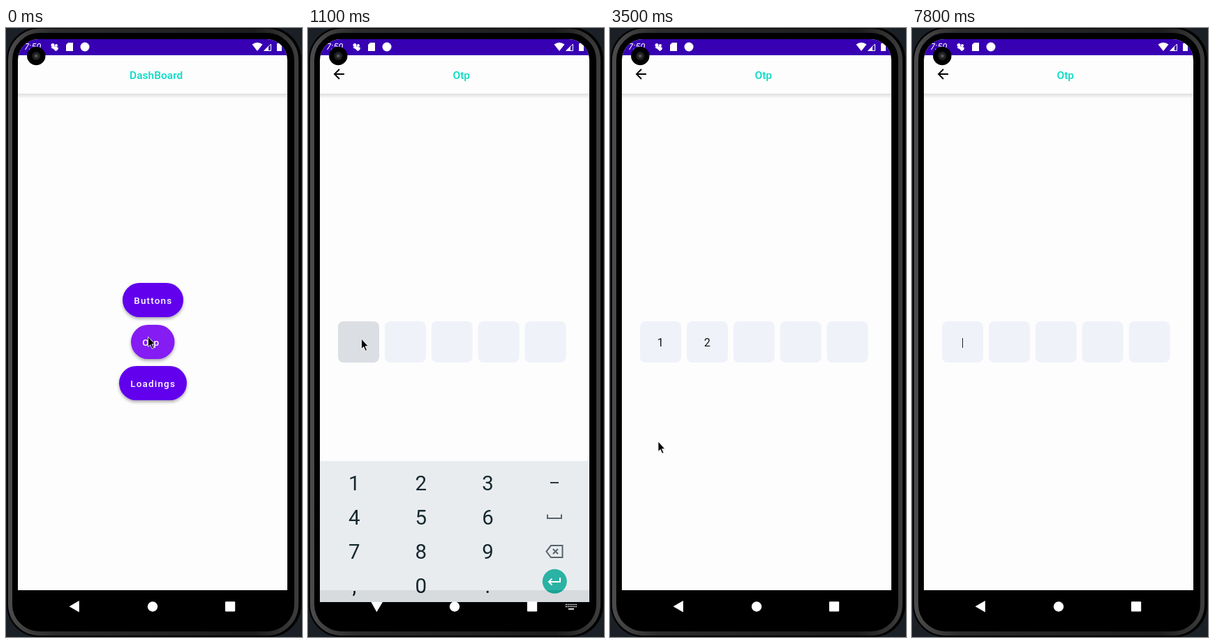
An HTML page for the animation above (7.9 s loop, 424 by 872 pixels).

```html
<!DOCTYPE html>
<html lang="en">
<head>
<meta charset="utf-8">
<title>Otp entry</title>
<style>
html, body { margin: 0; width: 100%; height: 100%; overflow: hidden; background: #1b2026; }
svg { display: block; width: 424px; height: 872px; font-family: Roboto, sans-serif; }
.title { font-size: 15.5px; font-weight: 500; fill: #03dac5; }
.button text { font-size: 13.5px; font-weight: 500; letter-spacing: 1.15px; fill: #fff; }
.digit { font-size: 16px; fill: #151515; text-anchor: middle; }
.key { font-size: 29.5px; fill: #061b22; text-anchor: middle; }
.line { fill: none; stroke: #4a5a61; stroke-width: 2; }
</style>
</head>
<body>
<svg viewBox="0 0 424 872">
  <defs>
    <linearGradient id="fade" x2="0" y2="1">
      <stop stop-color="#dedede"/><stop offset="1" stop-color="#fdfdfd"/>
    </linearGradient>
    <linearGradient id="metal" x2="1" y2="0">
      <stop stop-color="#4a4a4a"/><stop offset=".15" stop-color="#2c2c2c"/>
      <stop offset=".85" stop-color="#1c1c1c"/><stop offset="1" stop-color="#3c3c3c"/>
    </linearGradient>
    <filter id="shadow" x="-20%" y="-20%" width="140%" height="160%">
      <feDropShadow dx="0" dy="2.5" stdDeviation="2.2" flood-opacity=".33"/>
    </filter>
    <clipPath id="screen"><rect x="17" y="16" width="386" height="836" rx="30"/></clipPath>
  </defs>

  <!-- phone body -->
  <rect width="424" height="872" fill="#1b2026"/>
  <rect x="1" y="-1" width="422" height="873" rx="46"/>
  <rect x="6" y="4" width="410" height="863" rx="42" fill="none" stroke="url(#metal)" stroke-width="6"/>

  <g clip-path="url(#screen)">
    <path fill="#fdfdfd" d="M17 16H403V805H17z"/>
    <path fill="#3700b3" d="M17 16H403V39H17z"/>
    <path fill="url(#fade)" d="M17 94H403V101H17z"/>

    <g fill="#fff">
      <text x="26" y="31" font-size="13" font-style="italic">7:50</text>
      <circle cx="67" cy="24.5" r="2.5"/><circle cx="72" cy="25" r="2"/>
      <path d="M64 28l5-2 6 2q0 4-4 5l-3-3z"/>
      <path d="M86 24l3-3h7v12H86z"/>
      <circle cx="113" cy="27" r="6.5"/>
      <path d="M352.5 23.5q7.5-5.5 15 0L360 33z"/>
      <path d="M369 33l7-7v7z"/>
      <path d="M370 32.5h9.5v-9.5z" fill="none" stroke="#fff"/>
      <path d="M388 22h2v-1h3v1h2v11h-7z"/>
    </g>

    <g id="otp">
      <text class="title" x="207.5" y="73">Otp</text>
      <path d="M52 66H38.5M45 59l-7 7 7 7" fill="none" stroke="#000" stroke-width="1.9"/>
      <path id="caret" d="M72.5 444v14" stroke="#222"/>
    </g>
    <g id="dashboard">
      <text class="title" x="177" y="73">DashBoard</text>
    </g>

    <g id="keyboard">
      <path fill="#e8ebee" d="M17 603H403V805H17z"/>
      <path class="line" d="M347 634h12" style="stroke:#16282f"/>
      <path class="line" d="M343 679.500v5.500h20v-5.500"/>
      <path class="line" d="M348 724h16.500v17H348l-6.500-8.500zM351 729l7 7m0-7l-7 7"/>
      <circle cx="353.300" cy="775.300" r="17.500" fill="#1bae9e"/>
      <path class="line" d="M361 770v6h-16m4.500-4.500l-4.500 4.500 4.500 4.500" style="stroke:#fff"/>
    </g>
  </g>

  <!-- navigation bar -->
  <g fill="#fff">
    <path id="back" d="M-8 0L6.300-8.300V8.300z"/>
    <circle cx="210" cy="828.500" r="7.200"/>
    <rect x="314" y="821.300" width="14.200" height="14.200" rx="1"/>
    <path id="imeIcon" d="M369 825.500h16m-16 3h16" fill="none" stroke="#fff" stroke-width="1.700" stroke-dasharray="1.700 1.100"/>
    <path id="imeBar" d="M373 831h8v1.700h-8z"/>
  </g>

  <!-- camera -->
  <circle cx="43.300" cy="40" r="13.200"/>
  <circle cx="43.300" cy="40" r="6" fill="#202022"/>
  <circle cx="43.300" cy="40" r="2.500" fill="#505054"/>

  <path id="mouse" d="M0 0V14.500L3.200 11.600 5.800 17.300 8 16.300 5.500 10.700H9.800z" stroke="#fff" stroke-width=".8"/>
</svg>
<script>
const LOOP = 7900, STEP = 100;
const $ = id => document.getElementById(id);
const clamp = v => Math.min(1, Math.max(0, v));

function add(parent, tag, attrs, text = '') {
  const node = document.createElementNS('http://www.w3.org/2000/svg', tag);
  for (const name in attrs) node.setAttribute(name, attrs[name]);
  node.textContent = text;
  return parent.appendChild(node);
}

function addButton(label, x, y, width, color) {
  const group = add($('dashboard'), 'g', { class: 'button' });
  add(group, 'rect', { x, y, width, height: 49, rx: 24.5, fill: color, filter: 'url(#shadow)' });
  add(group, 'text', { x: x + 16.3, y: y + 30 }, label);
}
addButton('Buttons', 167, 365, 87, '#6200ee');
addButton('Otp', 179, 425, 62.5, '#841af3');
addButton('Loadings', 162, 484, 97, '#6200ee');

const cells = Array.from({ length: 5 }, (_, i) => {
  const x = 43 + i * 66.9;
  const box = add($('otp'), 'rect', { x, y: 420, width: 59, height: 59, rx: 8, fill: '#eff2f9' });
  const digit = add($('otp'), 'text', { x: x + 29.3, y: 456, class: 'digit' });
  return { box, digit };
});
$('otp').append($('caret'));

['123', '456', '789', ',0.'].forEach((row, r) => [...row].forEach((key, c) =>
  add($('keyboard'), 'text', { x: 66.3 + c * 95.6, y: 644.6 + r * 49, class: 'key' }, key)));

// Each entry holds from its time until the next one.
const typed = [
  [0, ''], [1400, '1'], [1700, '12'], [1900, '123'], [2100, '1234'], [2300, '12345'],
  [3300, '1234'], [3400, '123'], [3500, '12'], [3600, '1'], [3700, ''],
  [4300, '2'], [4500, '23'], [4900, '234'], [5100, '2345'], [5300, '23456'],
  [5700, '2345'], [5900, '234'], [6400, '23'], [6500, '2'], [6700, '']
];
const caretShown = [[0, 1], [900, 0], [3700, 1], [4100, 0], [6700, 1], [7300, 0], [7800, 1]];
const mousePath = [[0, 203.5, 442], [400, 125.5, 449], [700, 76.5, 445], [1100, 76.5, 445], [1400, 69, 592]];

const held = (list, t) => list.findLast(([time]) => time <= t)[1];

function mouseAt(t) {
  const next = mousePath.findIndex(([time]) => time > t);
  if (next < 0) return mousePath.at(-1).slice(1);
  const [t0, x0, y0] = mousePath[next - 1], [t1, x1, y1] = mousePath[next];
  const p = (t - t0) / (t1 - t0);
  return [x0 + (x1 - x0) * p, y0 + (y1 - y0) * p];
}

// cubic-bezier(.4, 0, .2, 1)
function fastOutSlowIn(x) {
  let low = 0, high = 1, s;
  for (let i = 0; i < 20; i++) {
    s = (low + high) / 2;
    const bx = 1.2 * s * (1 - s) ** 2 + .6 * s * s * (1 - s) + s ** 3;
    if (bx < x) low = s; else high = s;
  }
  return 3 * s * s * (1 - s) + s ** 3;
}

function keyboardAt(t) {
  if (t < 2400) {
    const p = clamp((t - 900) / 300);
    return { shift: 202 * (1 - p) ** 2.25, alpha: clamp(p * 1.4), turn: -90 * (1 - (1 - p) ** 4) };
  }
  const p = clamp((t - 2400) / 200);
  return { shift: 202 * p ** 3, alpha: p < 1 ? 1 - .84 * p : 0, turn: -90 * (1 - p) ** 3.5 };
}

function draw(t) {
  const fade = fastOutSlowIn(clamp((t - 50) / 460));
  $('dashboard').setAttribute('opacity', 1 - fade);
  $('otp').setAttribute('opacity', fade);

  const text = held(typed, t);
  cells.forEach(({ digit }, i) => digit.textContent = text[i] || '');
  $('caret').setAttribute('opacity', held(caretShown, t));

  const press = clamp(1 - Math.abs(t - 1000) / 250);
  cells[0].box.setAttribute('fill', `rgb(${239 - 34 * press},${242 - 34 * press},${249 - 36 * press})`);

  const { shift, alpha, turn } = keyboardAt(t);
  $('keyboard').setAttribute('transform', `translate(0 ${shift})`);
  $('keyboard').setAttribute('opacity', alpha);
  $('back').setAttribute('transform', `translate(98.5 828.2) rotate(${turn})`);
  const ime = t > 900 && t < 2500 ? 1 : 0;
  $('imeIcon').setAttribute('opacity', ime);
  $('imeBar').setAttribute('opacity', ime);

  $('mouse').setAttribute('transform', `translate(${mouseAt(t)})`);
  $('mouse').setAttribute('opacity', t < 7300 ? 1 : 0);
}

const start = performance.now();
function tick() {
  const t = (performance.now() - start) % LOOP;
  draw(Math.floor(t / STEP) * STEP);
  requestAnimationFrame(tick);
}
tick();
</script>
</body>
</html>
```
